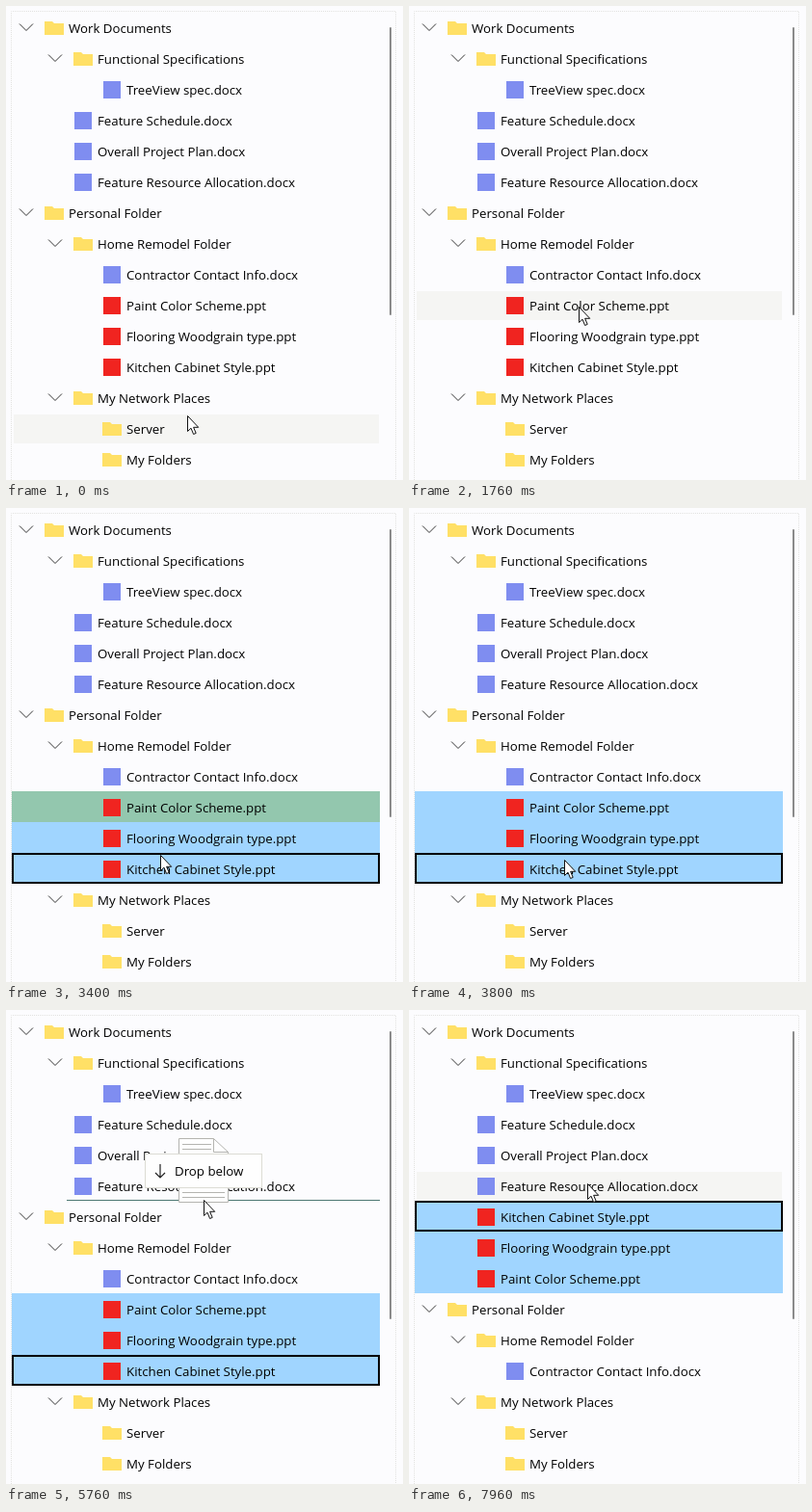
Animation, 412 px wide and 492 px high, one loop 8000 ms. Source, as an HTML page:

```html
<!DOCTYPE html>
<html lang="en">
<head>
<meta charset="utf-8">
<title>Tree drag and drop</title>
<style>
html, body { margin: 0; width: 100%; height: 100%; overflow: hidden; background: #fcfcfe; }
svg { display: block; width: 412px; height: 492px; }
text { font: 13.27px "Open Sans", "Noto Sans", sans-serif; fill: #000; white-space: pre; }
</style>
</head>
<body>
<svg id="stage" viewBox="0 0 412 492" xmlns="http://www.w3.org/2000/svg"></svg>
<script>
const LOOP = 8000, STEP = 40, ROW = 32, TOP = 7;
const DRAG = 3840, DROP = 6080;

// label, level, icon
const items = [
  ['Work Documents', 0, 'folder'],
  ['Functional Specifications', 1, 'folder'],
  ['TreeView spec.docx', 2, 'doc'],
  ['Feature Schedule.docx', 1, 'doc'],
  ['Overall Project Plan.docx', 1, 'doc'],
  ['Feature Resource Allocation.docx', 1, 'doc'],
  ['Personal Folder', 0, 'folder'],
  ['Home Remodel Folder', 1, 'folder'],
  ['Contractor Contact Info.docx', 2, 'doc'],
  ['Paint Color Scheme.ppt', 2, 'ppt'],
  ['Flooring Woodgrain type.ppt', 2, 'ppt'],
  ['Kitchen Cabinet Style.ppt', 2, 'ppt'],
  ['My Network Places', 1, 'folder'],
  ['Server', 2, 'folder'],
  ['My Folders', 2, 'folder']
];
const PAINT = 9, FLOOR = 10, KITCHEN = 11;
const before = items.map((_, i) => i);
const after = [0, 1, 2, 3, 4, 5, KITCHEN, FLOOR, PAINT, 6, 7, 8, 12, 13, 14];
const expanded = new Set([0, 1, 6, 7, 12]);

// selection times: item, start
const picks = [[PAINT, 1920], [FLOOR, 2680], [KITCHEN, 3160]];
const tinted = [[3160, 3520], [6320, 6960]];

// pointer path: time, x, y
const path = [
  [0, 188, 425], [160, 186, 430], [340, 186, 430], [960, 222, 298],
  [1160, 222, 305], [1200, 222, 305], [1520, 176, 312], [1900, 176, 312],
  [2320, 171, 343], [2560, 171, 343], [2960, 166, 370], [3160, 163, 367],
  [3400, 160, 360], [3840, 161, 365], [4160, 178, 314], [4520, 217, 215],
  [5000, 212, 203], [5280, 206, 200], [5620, 206, 200], [5880, 204, 194],
  [6060, 204, 194], [6400, 206, 283], [6800, 196, 248], [6920, 196, 246],
  [7240, 190, 194], [7720, 185, 186], [7760, 185, 180], [8000, 185, 180]
];

const stage = document.getElementById('stage');
function add(parent, tag, attrs, text) {
  const el = document.createElementNS(stage.namespaceURI, tag);
  for (const k in attrs) el.setAttribute(k, attrs[k]);
  if (text) el.textContent = text;
  return parent.appendChild(el);
}
const move = (el, x, y) => el.setAttribute('transform', `translate(${x} ${y})`);
const show = (el, on) => el.setAttribute('visibility', on ? 'visible' : 'hidden');
const within = (t, [a, b]) => t >= a && t < b;

// frame
add(stage, 'path', { d: 'M5.5 492V5.5H404.5V492', fill: 'none', stroke: '#e2e2e0', 'stroke-dasharray': '1 1' });
add(stage, 'rect', { x: 398, y: 22, width: 2, height: 299, rx: 1, fill: '#8b8b8b' });

const icons = {
  folder: g => add(g, 'path', { d: 'M0 -7H8L10 -5H20V7H0Z', fill: '#ffe066' }),
  doc: g => add(g, 'rect', { x: 1, y: -9, width: 18, height: 18, fill: '#7f8df0' }),
  ppt: g => add(g, 'rect', { x: 1, y: -9, width: 18, height: 18, fill: '#f02420' })
};

const rows = items.map(([label, , icon], i) => {
  const g = add(stage, 'g', {});
  const hover = add(g, 'rect', { x: 8, y: 1, width: 379, height: 30, fill: '#f5f5f3' });
  const sel = add(g, 'rect', { x: 6, y: -1, width: 382, height: 32 });
  const focus = add(g, 'rect', { x: 7, y: 0, width: 380, height: 30, fill: 'none', stroke: '#000', 'stroke-width': 2 });
  const body = add(g, 'g', {});
  if (expanded.has(i)) add(body, 'path', { d: 'M-26 -4.5L-19 2.5L-12 -4.5', fill: 'none', stroke: '#333' });
  icons[icon](body);
  add(body, 'text', { x: 25, y: 5 }, label);
  return { g, hover, sel, focus, body };
});

const line = add(stage, 'path', { stroke: '#4d7873' });

// dragged sheet, hint and pointer
const ghost = add(stage, 'g', {});
add(ghost, 'path', { d: 'M-25.5 -63.5H10.5L25.5 -49.5V2.5H-25.5Z', fill: '#fefefe', stroke: '#b4b4b0' });
add(ghost, 'path', { d: 'M10.5 -63.5V-49.5H25.5', fill: 'none', stroke: '#b4b4b0' });
for (let y = -57.5; y < 2; y += 5)
  add(ghost, 'path', { d: `M-22 ${y}H${y < -48 ? 8 : 22}`, stroke: '#b4b4b0' });

const tip = add(stage, 'g', {});
add(tip, 'rect', { x: -60.5, y: -47.5, width: 121, height: 35, fill: '#fefefe', stroke: '#dcdcd4' });
const arrow = add(tip, 'path', { fill: 'none', stroke: '#222', 'stroke-width': 1.2 });
const hint = add(tip, 'text', { x: -30, y: -25 });

const pointer = add(stage, 'path', {
  d: 'M.5 .5V16.5L4 13.2L6.6 19.5L9.2 18.4L6.6 12.3H11.7Z', fill: '#fff', stroke: '#111', 'stroke-linejoin': 'round'
});

const hints = {
  above: ['Drop above', 'M-45 -23V-37M-50 -32L-45 -37L-40 -32'],
  child: ['Drop as child', 'M-52 -24L-38 -37M-47 -37H-38V-28'],
  below: ['Drop below', 'M-45 -37V-23M-50 -28L-45 -23L-40 -28']
};

function pointerAt(t) {
  const n = path.findIndex(p => p[0] > t);
  const [t0, x0, y0] = path[n - 1], [t1, x1, y1] = path[n];
  const k = (t - t0) / (t1 - t0);
  return [x0 + (x1 - x0) * k, y0 + (y1 - y0) * k].map(Math.round);
}

function draw(t) {
  const [x, y] = pointerAt(t);
  const dragging = within(t, [DRAG, DROP]);
  const order = t < DROP ? before : after;
  const over = Math.floor((y - TOP) / ROW);
  const chosen = picks.filter(p => t >= p[1]).map(p => p[0]);
  const tint = tinted.some(span => within(t, span));

  order.forEach((id, n) => {
    const r = rows[id], on = chosen.includes(id);
    const level = t >= DROP && id >= PAINT && id <= KITCHEN ? 1 : items[id][1];
    move(r.g, 0, TOP + n * ROW);
    move(r.body, 40 + level * 30, 16);
    show(r.hover, !on && !dragging && n === over);
    show(r.sel, on);
    show(r.focus, id === chosen[chosen.length - 1]);
    r.sel.setAttribute('fill', id === PAINT && tint ? '#93c7ae' : '#a0d5ff');
  });

  const valid = dragging && !chosen.includes(order[over]);
  show(ghost, dragging);
  show(tip, valid);
  show(line, valid);
  if (valid) {
    const top = TOP + over * ROW, part = y - top;
    const place = part < 9 ? 'above' : part > 23 ? 'below' : 'child';
    const ly = top + { above: .5, child: ROW - .5, below: ROW - 1.5 }[place];
    line.setAttribute('d', `M${33 + items[order[over]][1] * 30} ${ly}H388`);
    hint.textContent = hints[place][0];
    arrow.setAttribute('d', hints[place][1]);
  }
  for (const el of [ghost, tip, pointer]) move(el, x, y);
}

const start = performance.now();
function tick() {
  const t = (performance.now() - start) % LOOP;
  draw(Math.floor(t / STEP) * STEP);
  requestAnimationFrame(tick);
}
tick();
</script>
</body>
</html>
```
